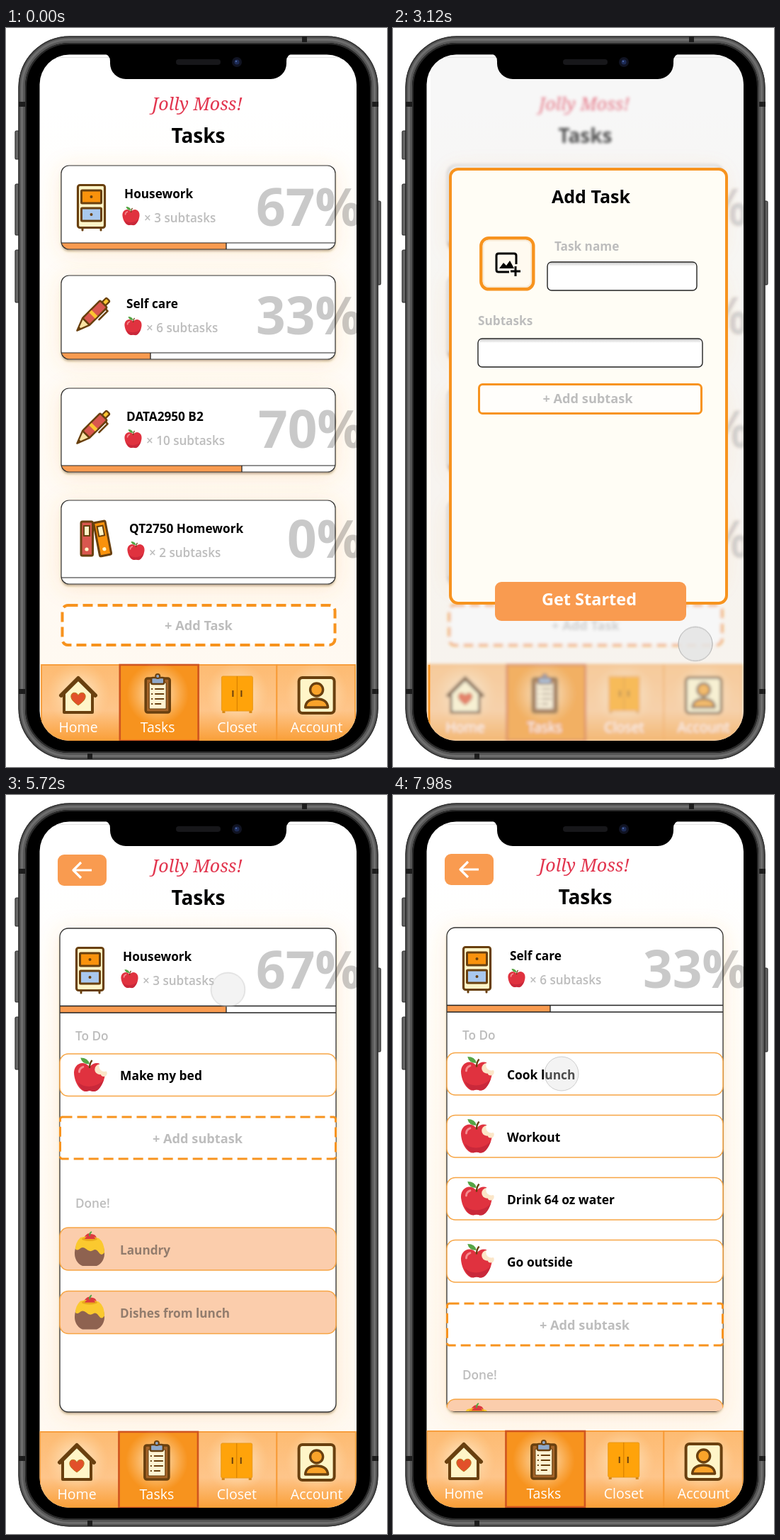
Write an HTML page that moves like this. It is 538 px wide and 1042 px high and loops after 8 s.

```html
<!DOCTYPE html>
<html lang="en">
<head>
<meta charset="utf-8">
<title>Task app</title>
<style>
html, body { margin: 0; width: 100%; height: 100%; overflow: hidden; background: #fff; }
svg { display: block; width: 538px; height: 1042px; }
text { font-family: "Open Sans", "Noto Sans", sans-serif; white-space: pre; }
.brand { font-family: "Noto Serif", "Liberation Serif", serif; font-style: italic; }
</style>
</head>
<body>
<svg id="stage" viewBox="0 0 538 1042"></svg>
<script>
const LOOP = 8000;
const ORANGE = '#f7931e', PEACH = '#f99b50', GREY = '#bdbdbd', BROWN = '#69400f', CREAM = '#fff5c8';

// Drawing helpers
const text = (x, y, size, str, fill = '#000', weight = 700, anchor = 'start') =>
  `<text x="${x}" y="${y}" font-size="${size}" fill="${fill}" font-weight="${weight}" text-anchor="${anchor}">${str}</text>`;
const mid = (x, y, size, str, fill, weight) => text(x, y, size, str, fill, weight, 'middle');
const rect = (x, y, w, h, r, fill, stroke = 'none', sw = 1, extra = '') =>
  `<rect x="${x}" y="${y}" width="${w}" height="${h}" rx="${r}" fill="${fill}" stroke="${stroke}" stroke-width="${sw}" ${extra}/>`;
const path = (d, fill = 'none', stroke = 'none', sw = 1, extra = '') =>
  `<path d="${d}" fill="${fill}" stroke="${stroke}" stroke-width="${sw}" stroke-linejoin="round" ${extra}/>`;
const circle = (x, y, r, fill, extra = '') => `<circle cx="${x}" cy="${y}" r="${r}" fill="${fill}" ${extra}/>`;
const place = (x, y, content, more = '') => `<g transform="translate(${x} ${y}) ${more}">${content}</g>`;
const dashed = (x, y, w, h, r, sw) => rect(x, y, w, h, r, '#fff', ORANGE, sw, 'stroke-dasharray="14 7"');

// Icons
const apple = (x, y, scale, bitten) => place(x, y,
  path('M0-7C5-13 13-9 12-1C11 7 6 13 2 12Q0 11-2 12C-6 13-11 7-12-1C-13-9-5-13 0-7Z', '#e0323f') +
  path('M-9 5C-4 10 6 9 11 3C9 9 6 13 2 12Q0 11-2 12C-5 12-8 9-9 5Z', '#c9283a') +
  path('M-8-3Q-8-6-5-7', 'none', '#f58a8f', 1.6, 'stroke-linecap="round"') +
  path('M0-6Q0-10 2-12', 'none', BROWN, 1.3) +
  path('M0-9Q-6-9-7-14Q-1-14 0-9Z', '#55a545') +
  (bitten ? circle(8, -5, 4, '#fbe6c8') + circle(11, -2, 2.6, '#fbe6c8') + circle(11.5, -7.5, 4.2, '#fff') : ''),
  `scale(${scale})`);

const pot = (x, y) => place(x, y,
  path('M-8-16Q-3-24 2-21Q9-21 10-15Z', '#dc3a3f') +
  path('M0-18Q0-23 3-24', 'none', '#55a545', 2) +
  path('M-17-8C-24 4-22 19-10 24H10C22 19 24 4 17-8Z', '#8e6250') +
  path('M-13-16Q0-20 13-15Q21-9 21 5Q17 11 13 5Q9-1 5 2Q0 5-5 0Q-10-4-14 0Q-18 3-20 0Q-20-9-13-16Z', '#fbc92f') +
  `<ellipse cy="-14" rx="11" ry="3" fill="#e9a91c"/>` +
  path('M-7-14Q-3-20 0-18Q6-20 8-14Z', '#dc3a3f'));

const cabinet = (x, y) => place(x, y,
  path('M8 61V65M34 61V65', 'none', BROWN, 3, 'stroke-linecap="round"') +
  rect(1.5, 1.5, 38, 60, 3, CREAM, BROWN, 3.2) +
  rect(6.5, 9, 28, 18, 1, '#f9920c', BROWN, 3) +
  rect(6.5, 34, 28, 18, 1, '#a9c8ee', BROWN, 3) +
  circle(20.5, 18, 2, BROWN) + circle(20.5, 43, 2, BROWN));

const pen = (x, y) => place(x, y,
  rect(-3.5, -30, 7, 9, 2, '#fbc531', BROWN, 2.4) +
  path('M-7 14L0 32L7 14Z', '#fbe3a4', BROWN, 2.4) +
  path('M-2 26L0 32L2 26Z', BROWN) +
  rect(-7, -21, 14, 35, 2, '#d9574f', BROWN, 2.6) +
  rect(-6, -3, 12, 5, 0, '#fbc531') +
  path('M7-18H11V-1', 'none', BROWN, 2.6, 'stroke-linecap="round"'), 'rotate(45)');

const binder = color =>
  rect(-8, -24, 16.5, 48, 2, color, BROWN, 3) + rect(-4, -18, 8, 14, 0, CREAM, BROWN, 2) + circle(0, 15, 2.6, CREAM);
const binders = (x, y) => place(x - 13, y, binder('#d9574f')) + place(x + 9, y, binder('#f9920c'), 'rotate(-11)');

const house =
  path('M-20-3V25H20V-3L0-22Z', CREAM, BROWN, 4) +
  path('M-24 1L0-23L24 1', 'none', BROWN, 6, 'stroke-linecap="round"') +
  path('M0 15C-7 10-11 6-10 1C-9-4-2-4 0 1C2-4 9-4 10 1C11 6 7 10 0 15Z', '#e2502a', '#b87a1c', 1);
const clipboard =
  rect(-17, -23, 34, 48, 3, '#a5652a', BROWN, 3.6) + rect(-12, -17, 24, 37, 1, '#fff3d2', BROWN, 1.2) +
  path('M-4-8H9M-4-1H9M-4 6H9M-4 13H5', 'none', BROWN, 2) +
  path('M-9-8H-7M-9-1H-7M-9 6H-7M-9 13H-7', 'none', BROWN, 2) +
  rect(-9, -24, 18, 9, 2, '#8fa9cb', BROWN, 2.4) + circle(0, -26, 3, '#8fa9cb', `stroke="${BROWN}" stroke-width="2"`);
const closet =
  rect(-22, -26, 44, 49, 2, '#ffa30a', '#e99a1c', 1) +
  path('M0-26V23', 'none', '#d98200', 1.2) + path('M-6-6V3M6-6V3', 'none', BROWN, 2) +
  path('M-19 23V26M19 23V26', 'none', '#d98a18', 4);
const account =
  rect(-25, -24, 50, 50, 5, CREAM, BROWN, 4) +
  circle(0, -7, 9, '#f9a32a', `stroke="${BROWN}" stroke-width="3.4"`) +
  path('M-16 18Q-15 6 0 6Q15 6 16 18Z', '#f9a32a', BROWN, 3.4);

// Shared screen parts
const TABS = [['Home', house], ['Tasks', clipboard], ['Closet', closet], ['Account', account]];
const nav = shift => {
  const left = i => 50 + i * 110.8 + shift * (1 - i / 3);
  const cell = (i, active) => rect(left(i), 898, left(i + 1) - left(i), 107, 0,
    active ? ORANGE : 'url(#tab)', active ? '#cf5520' : '#f79a35', active ? 2.6 : 1.8);
  const content = ([label, icon], i) => {
    const x = 102 + i * 112.2 + shift * (1 - i / 3);
    return circle(x, 939, 44, 'url(#glow)') + place(x, 940, icon) + mid(x, 993, 19.5, label, '#fff', 400);
  };
  return cell(0) + cell(2) + cell(3) + cell(1, true) + TABS.map(content).join('');
};

const heading = y =>
  `<text class="brand" x="270" y="${y - 46}" font-size="25" fill="#e2364f" text-anchor="middle">Jolly Moss!</text>` +
  mid(271.5, y, 28, 'Tasks');

const summary = (x, y, title, count, percent, px, py) =>
  text(x, y + 46, 17.2, title) + apple(x + 9.5, y + 72, 1) +
  text(x + 28, y + 80, 17.1, `× ${count} subtasks`, GREY, 600) +
  `<text x="${px}" y="${py}" font-size="73" font-weight="700" fill-opacity=".21">${percent}%</text>`;

// Task list
const card = ([y, x, title, count, percent, px, py, end, icon]) =>
  rect(78, y, 387, 118, 11, '#fff', 'none', 0, 'filter="url(#lift)"') +
  (end ? path(`M78.5 ${y + 109}H${end}V${y + 118}H89Q79 ${y + 118} 78.5 ${y + 109}Z`, PEACH) +
    path(`M${end} ${y + 109}V${y + 118}`, 'none', '#222', 1.3) : '') +
  path(`M78 ${y + 109}H465`, 'none', '#222', 1.2) +
  rect(78, y, 387, 118, 11, 'none', '#333', 1.2) + icon + summary(x, y, title, count, percent, px, py);

const list = heading(161.5) + [
  [194, 167, 'Housework', 3, 67, 353, 279, 311, cabinet(100, 220)],
  [349, 170, 'Self care', 6, 33, 353, 432, 204, pen(123, 404)],
  [508, 170, 'DATA2950 B2', 10, 70, 356, 592, 333, pen(123, 563)],
  [666, 174, 'QT2750 Homework', 2, 0, 397, 747, 0, binders(127, 720)]
].map(card).join('') + dashed(79.5, 814, 385, 56, 8, 4) + mid(272, 849, 18.2, '+ Add Task', GREY) + nav(0);

// Add-task dialog
const field = (x, y, w) => rect(x, y, w, 40, 6, '#fff', '#222', 1.4) +
  rect(x + 1.5, y + 1, w - 3, 5, 4, 'url(#inset)');
const addTask =
  `<g filter="url(#blur)">${list}</g>` + rect(53, 37, 442, 968, 0, '#e8e8e8', 'none', 0, 'opacity=".35"') +
  path('M51 898V1004', 'none', ORANGE, 2.4) +
  rect(81, 199, 390, 612, 11, '#fffdf5', ORANGE, 4) + mid(279.5, 247, 25, 'Add Task') +
  rect(124.3, 296.3, 74, 72, 11, '#fffaf0', ORANGE, 4.4) +
  rect(127.5, 299.5, 67.5, 65.5, 8, 'none', '#f3dfc4', 2, 'opacity=".6"') +
  path('M174 333V321Q174 318 171 318H149Q146 318 146 321V341Q146 344 149 344H164M173 336V350M166 343H180', 'none', '#000', 3) +
  path('M150 339L156 331L160 335L165 328L171 339Z', '#000') +
  text(228, 314, 17.2, 'Task name', GREY) + field(218, 330, 211) +
  text(120, 419, 17.2, 'Subtasks', GREY) + field(120, 438, 317) +
  rect(121.5, 502.5, 314, 41, 5, '#fffefb', ORANGE, 3) + mid(275, 529, 18.2, '+ Add subtask', GREY) +
  rect(144, 781, 270, 55, 9, PEACH) + mid(277, 814, 23.5, 'Get Started', '#fff');

// Task details
const todo = (y, label) => rect(76, y, 390, 59.5, 12, '#fff', '#f7a544', 1.5) + apple(118, y + 31, 1.82, true) + text(161, y + 37, 17.4, label);
const done = (y, label) => rect(76, y, 390, 60, 12, '#fbcdac', '#f7a544', 1.5) + pot(118, y + 30) + text(161, y + 37.5, 17.2, label, '#927c6d');
const addSubtask = y => dashed(76.5, y, 389, 59, 3, 3) + mid(270.5, y + 37, 18.2, '+ Add subtask', GREY);
const caption = (y, label) => text(98, y, 17.2, label, GREY, 600);

const detail = (title, count, percent, end, rows) => heading(155) +
  rect(73, 84, 69, 44, 9, PEACH) +
  path('M121 106H96M106 95L95 106L106 117', 'none', '#fff', 3.2) +
  rect(76, 188, 390, 682, 12, '#fff', 'none', 0, 'filter="url(#lift)"') +
  rect(76, 298, end - 76, 9, 0, PEACH) +
  path(`M76 297.5H466M76 307H466M${end} 297V307`, 'none', '#222', 1.3) +
  cabinet(98, 214) + summary(165, 188, title, count, percent, 353, 273) +
  rect(76, 188, 390, 682, 12, 'none', '#333', 1.3) +
  `<g clip-path="url(#panel)">${caption(346, 'To Do') + rows}</g>` + nav(-2);

const housework = detail('Housework', 3, 67, 311,
  todo(365, 'Make my bed') + addSubtask(454) + caption(582, 'Done!') +
  done(610, 'Laundry') + done(699.5, 'Dishes from lunch'));

const chores = ['Cook lunch', 'Workout', 'Drink 64 oz water', 'Go outside'];
const selfCare = place(0, -1, detail('Self care', 6, 33, 222,
  chores.map((label, i) => todo(364.5 + i * 88, label)).join('') +
  addSubtask(718) + caption(825, 'Done!') + done(853, 'Nap')));

// Phone
const band = (x, y, w, h) => rect(x, y, w, h, 0, '#1d1d1d');
const ring = (inset, color, width) =>
  rect(17.5 + inset, 11.5 + inset, 508 - 2 * inset, 1020 - 2 * inset, 72 - inset, 'none', color, width);
const phone =
  [[13, 145, 40], [13, 220, 72], [13, 313, 74], [523, 244, 118]]
    .map(([x, y, h]) => rect(x, y, 6, h, 2, '#666', '#2c2c2c', 1.2)).join('') +
  rect(17.5, 11.5, 508, 1020, 72, '#000') +
  ring(1, '#333', 2) + ring(5.5, '#565656', 8) + ring(5, '#6e6e6e', 3) + ring(10.5, '#2a2a2a', 2) +
  band(18, 104, 9, 7) + band(517, 104, 9, 7) + band(18, 932, 9, 7) + band(517, 932, 9, 7) +
  band(418, 12, 7, 8) + band(115, 1023, 7, 8);
const notch =
  path('M137 36Q147 37 147 47V50A22 22 0 0 0 169 72H374A22 22 0 0 0 396 50V47Q396 37 406 36Z', '#000') +
  rect(240, 44, 63, 8, 4, '#17171a') + circle(326, 48, 7, '#101322') + circle(326, 48, 3.6, '#1d2b56') + circle(325, 47, 1.2, '#4a64a0');

const defs = `<defs>
  <clipPath id="screen"><rect x="47.5" y="37.5" width="447.5" height="967.5" rx="42"/></clipPath>
  <clipPath id="panel"><rect x="74" y="188" width="394" height="682" rx="12"/></clipPath>
  <linearGradient id="paper" x2="0" y2="1"><stop offset=".08" stop-color="#fff"/><stop offset=".3" stop-color="#fffdf9"/><stop offset=".9" stop-color="#fff9f1"/></linearGradient>
  <linearGradient id="tab" x2="0" y2="1"><stop stop-color="#fdbb72"/><stop offset=".6" stop-color="#fec58a"/><stop offset="1" stop-color="#fa9f38"/></linearGradient>
  <linearGradient id="inset" x2="0" y2="1"><stop stop-color="#ccc"/><stop offset="1" stop-color="#fff"/></linearGradient>
  <radialGradient id="glow"><stop stop-color="#fff3dc" stop-opacity=".85"/><stop offset=".5" stop-color="#ffe6c2" stop-opacity=".5"/><stop offset="1" stop-color="#ffd9a6" stop-opacity="0"/></radialGradient>
  <filter id="lift" x="-20%" y="-40%" width="140%" height="180%">
    <feDropShadow dx="0" dy="3" stdDeviation="1.8" flood-color="#000" flood-opacity=".35"/>
    <feDropShadow dx="0" dy="4" stdDeviation="15" flood-color="#f7a040" flood-opacity=".2"/>
  </filter>
  <filter id="blur" filterUnits="userSpaceOnUse" x="40" y="30" width="470" height="990"><feGaussianBlur stdDeviation="2"/></filter>
</defs>`;

const SCREENS = { list, addTask, housework, selfCare };
stage.innerHTML = defs + phone +
  `<g clip-path="url(#screen)">${rect(47, 37, 448, 968, 0, 'url(#paper)')}${path('M47 41.5H495', 'none', '#e4e4e4', 1)}` +
  Object.entries(SCREENS).map(([id, content]) => `<g id="${id}" opacity="0">${content}</g>`).join('') + '</g>' + notch +
  `<g id="pointer">${circle(0, 0, 24, '#dcdcdc', 'fill-opacity=".35" stroke="#aaa" stroke-opacity=".55"')}
   ${circle(0, 0, 24, '#e6e6e6', 'id="press" fill-opacity=".8" stroke="#b4b4b4" stroke-width="1"')}</g>`;

// Motion
const run = (id, frames) => document.getElementById(id).animate(frames, { duration: LOOP, iterations: Infinity });
const switches = (id, steps) => {
  const frames = steps.map(([time, on]) => ({ offset: time / LOOP, opacity: on ? 1 : 0, easing: 'steps(1, end)' }));
  run(id, [...frames, { ...frames.at(-1), offset: 1 }]);
};

const VIEWS = [[0, 'list'], [1600, 'addTask'], [3260, 'list'], [4840, 'housework'], [6720, 'list'], [7980, 'selfCare']];
for (const id in SCREENS) switches(id, VIEWS.map(([time, view]) => [time, view === id]));

switches('pointer', [[0, 0], [400, 1]]);
const PRESSES = [[1460, 1600], [3100, 3260], [4720, 4840], [6600, 6720], [7860, 7980]];
switches('press', [[0, 0], ...PRESSES.flatMap(([down, up]) => [[down, 1], [up, 0]])]);

const SMOOTH = 'cubic-bezier(.4, 0, .25, 1)';
const ROUTE = [
  [0, 487, -26], [400, 487, -26, SMOOTH], [960, 347, 874], [1100, 347, 874, SMOOTH], [1200, 346.5, 849.5],
  [2500, 346.5, 849.5, SMOOTH], [2920, 427, 868.5], [3800, 427, 868.5, SMOOTH], [4560, 313.5, 274.5],
  [5720, 313.5, 274.5, SMOOTH], [6160, 125, 104, 'ease-out'], [6520, 116, 104.5],
  [7060, 116, 104.5, 'ease-in'], [7220, 241, 276], [7340, 246, 345, 'ease-out'], [7620, 238, 393], [LOOP, 238, 393]
];
run('pointer', ROUTE.map(([time, x, y, easing = 'linear']) =>
  ({ offset: time / LOOP, transform: `translate(${x}px, ${y}px)`, easing })));
</script>
</body>
</html>
```
